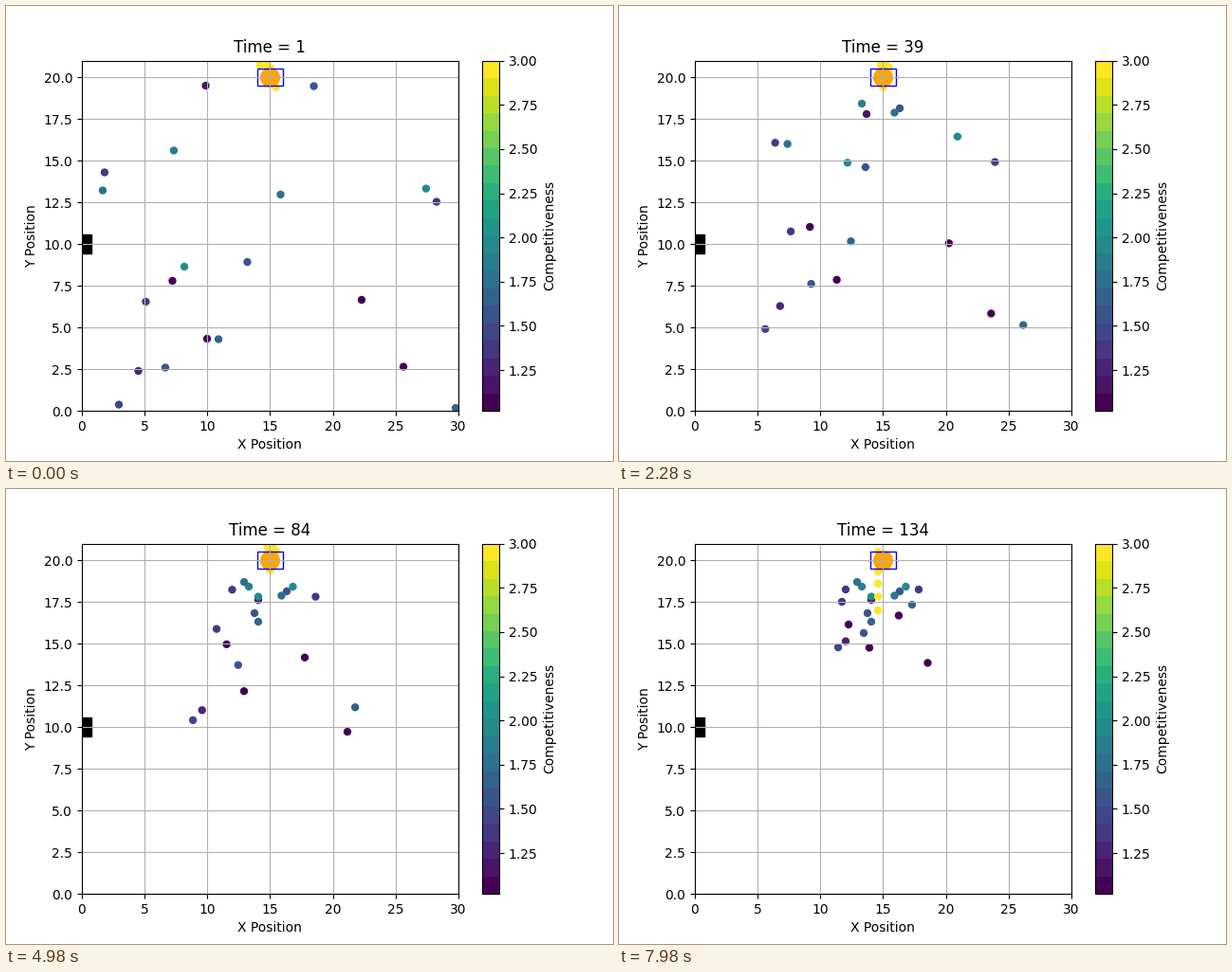
These frames come from a looping animation (640 px wide and 480 px high, 8000 ms). A matplotlib script:

```python
import numpy as np
import matplotlib.pyplot as plt
from matplotlib.animation import FuncAnimation
from matplotlib.patches import Rectangle

STEP_MS, TICK_MS, LOOP_MS = 60, 20, 8000
LAST = (LOOP_MS - 1) // STEP_MS
VMIN, VMAX = 1.0188, 3.0
PACE = 0.1            # distance per step for competitiveness 1
GOAL = np.array([15, 20])
LANE_X, LEAVE = 14.6, 120

# Competitiveness, start and waiting spot of each agent.
AGENTS = np.array([
    (1.13, 9.87, 19.50, 14.06, 17.63),
    (1.56, 18.49, 19.47, 16.33, 18.14),
    (1.85, 7.33, 15.61, 13.31, 18.42),
    (1.33, 1.81, 14.30, 12.02, 18.25),
    (1.72, 1.66, 13.22, 12.93, 18.70),
    (1.78, 15.84, 12.97, 15.91, 17.88),
    (1.95, 27.44, 13.33, 16.82, 18.42),
    (1.34, 28.27, 12.54, 17.84, 18.25),
    (1.54, 13.19, 8.93, 13.76, 16.83),
    (2.00, 8.17, 8.65, 14.06, 17.82),
    (1.02, 7.22, 7.80, 12.25, 16.15),
    (1.33, 5.10, 6.55, 11.72, 17.51),
    (1.07, 22.30, 6.66, 16.25, 16.69),
    (1.02, 9.98, 4.33, 13.91, 14.76),
    (1.64, 10.89, 4.30, 14.06, 16.32),
    (1.22, 4.50, 2.40, 12.02, 15.15),
    (1.53, 6.65, 2.60, 13.46, 15.64),
    (1.02, 25.63, 2.65, 18.56, 13.85),
    (1.42, 2.95, 0.38, 11.42, 14.78),
    (1.66, 29.79, 0.18, 17.31, 17.34),
])
LEVEL, START, SPOT = AGENTS[:, 0], AGENTS[:, 1:3], AGENTS[:, 3:]

# Places around the goal held by the agents being served.
SLOTS = np.array([(-0.2, 0.75), (0.3, 0.7), (0.5, 0.55), (0, -0.6), (0, 0), (0, 0)])
QUEUE_Y = 20.5 - 3.5 * np.linspace(0, 1, len(SLOTS)) ** 1.2


def walkers(n):
    """Speed up from rest, walk straight to the spot and wait there."""
    path = SPOT - START
    length = np.hypot(path[:, 0], path[:, 1])
    walked = PACE * LEVEL * (n - 1 + np.exp(-n))
    return START + path * np.minimum(walked / length, 1)[:, None]


def served(n):
    """Crowd the goal, then file out down the lane."""
    pos = GOAL + SLOTS
    pos[:, 0] -= 0.8 * np.exp(-n / 8) * SLOTS[:, 1]
    gone = np.clip((n - LEAVE) / (LAST - LEAVE), 0, 1)
    pos[:, 0] += (LANE_X - pos[:, 0]) * gone
    pos[:, 1] = np.minimum(pos[:, 1], QUEUE_Y + PACE * VMAX * (LAST - n))
    return pos


def positions(n):
    return np.vstack([walkers(n), served(n)])


fig, ax = plt.subplots(figsize=(6.4, 4.8), dpi=100)
dots = ax.scatter(*positions(0).T, c=np.append(LEVEL, [VMAX] * len(SLOTS)), s=25,
                  vmin=VMIN, vmax=VMAX, cmap=plt.get_cmap("viridis", 20))
door = ax.scatter([0], [10], s=200, marker="s", color="black")
goal = ax.scatter(*GOAL, s=200, color="orange")
counter = ax.add_patch(Rectangle((14, 19.5), 2, 1, fill=False, edgecolor="blue"))
bar = fig.colorbar(dots, label="Competitiveness")
ax.set(xlim=(0, 30), ylim=(0, 21), xlabel="X Position", ylabel="Y Position")
ax.grid(True)

# Render the fixed axes and grid once; they lie over the moving dots.
moving = [dots, door, goal, counter, fig.patch, ax.patch]
for art in moving:
    art.set_visible(False)
fig.canvas.draw()
overlay = np.array(fig.canvas.buffer_rgba())
for art in moving:
    art.set_visible(True)
ax.set_axis_off()
bar.ax.set_visible(False)
fig.figimage(overlay, zorder=5)
title = ax.set_title("Time = 1")


def update(i):
    n = i * TICK_MS // STEP_MS
    dots.set_offsets(positions(n))
    title.set_text(f"Time = {n + 1}")
    return dots, title


anim = FuncAnimation(fig, update, frames=LOOP_MS // TICK_MS, interval=TICK_MS,
                     repeat=True, repeat_delay=0, blit=False)
plt.show()
```
